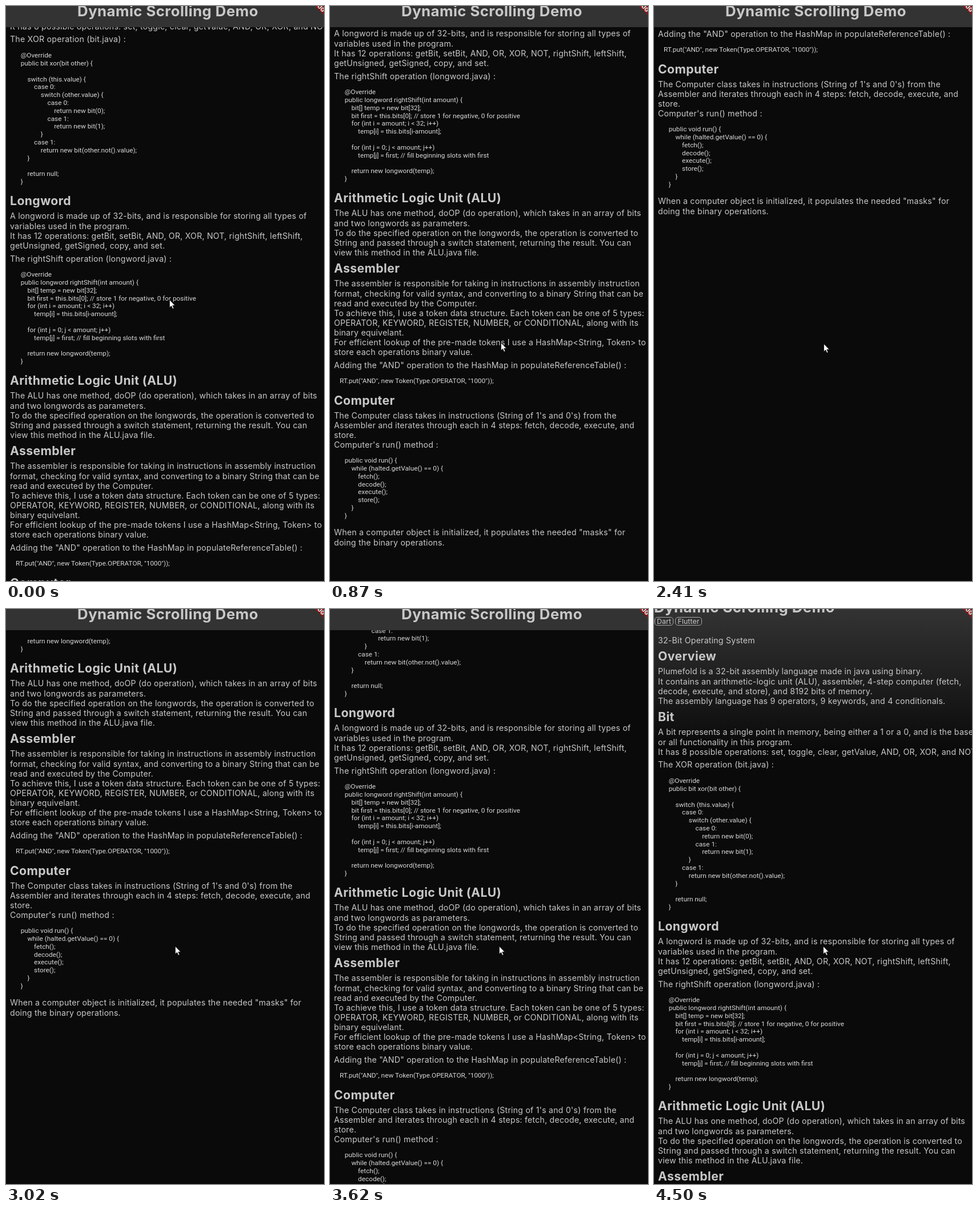
Write an HTML page that moves like this. It is 557 px wide and 1005 px high and loops after 4.81 s.

```html
<!DOCTYPE html>
<html lang="en">
<head>
<meta charset="utf-8">
<title>Dynamic Scrolling Demo</title>
<style>
html, body { margin: 0; width: 100%; height: 100%; overflow: hidden; background: #0a0a0a; }
#stage { position: relative; width: 557px; height: 1005px; overflow: hidden; background: #0a0a0a; color: #c8c8c8; }
#page, #cursor { position: absolute; left: 0; top: 0; will-change: transform; }
#page { width: 557px; }
#glow { position: absolute; left: 0; top: -614px; width: 557px; height: 645px;
  background: linear-gradient(#333 400px, #0a0a0a); }
.block { position: absolute; white-space: pre; }
.text { left: 7px; font: 14.2px/17.06px Inter, sans-serif; letter-spacing: .2px; }
.head { left: 7px; font: 700 21.2px/26px Inter, sans-serif; letter-spacing: .4px; }
.code { left: 14px; font: 11.8px/13.82px Roboto, sans-serif; color: #d8d8d8; }
.title { left: 0; font: 700 25.8px/32px Inter, sans-serif; letter-spacing: .42px; }
.chip { box-sizing: border-box; height: 15px; border: 1px solid #a8a8a8; border-radius: 5px;
  font: 12.3px/13px Inter, sans-serif; letter-spacing: .1px; text-align: center; top: -200px; }
#bar { position: absolute; left: 0; top: 0; width: 557px; height: 36.5px; background: #333; }
#bar .title { width: 567px; top: -7px; text-align: center; }
svg { position: absolute; left: 0; top: 0; overflow: visible; }
#ribbon text { font: 900 10.2px Roboto, sans-serif; fill: #e8e8e8; text-anchor: middle; }
</style>
</head>
<body>
<div id="stage">
  <div id="page">
    <div id="glow"></div>
    <div class="block chip" style="left:1px;width:33px">Dart</div>
    <div class="block chip" style="left:37px;width:47px">Flutter</div>
  </div>
  <div id="bar"><div class="block title">Dynamic Scrolling Demo</div></div>
  <svg id="ribbon" width="557" height="40">
    <path d="M540 0L557 17V0Z" fill="#7d1a1a"/>
    <text transform="translate(545.5 -3) rotate(45)" y="3.6">DEBUG</text>
  </svg>
  <svg id="cursor" width="12" height="18">
    <path d="M.5 .5V14L3.6 11.2L5.9 16.3L8 15.4L5.8 10.4H10Z" fill="#fff" stroke="#111" stroke-width=".8"/>
  </svg>
</div>
<script>
const LOOP = 4810;
const $ = id => document.getElementById(id);
const page = $('page'), bar = $('bar'), cursor = $('cursor');
const lineHeight = { text: 17.06, head: 26, code: 13.82, title: 32 };

// Places a block so that its first line is centred on y.
function add(kind, y, text) {
  const el = document.createElement('div');
  el.className = 'block ' + kind;
  el.style.top = y - lineHeight[kind] / 2 + 'px';
  el.textContent = text;
  page.append(el);
}

add('title', -217, 'Dynamic Scrolling Demo');
add('text', -159.5, '32-Bit Operating System');
add('head', -132, 'Overview');
add('text', -105, `Plumefold is a 32-bit assembly language made in java using binary.
It contains an arithmetic-logic unit (ALU), assembler, 4-step computer (fetch,
decode, execute, and store), and 8192 bits of memory.
The assembly language has 9 operators, 9 keywords, and 4 conditionals.`);
add('head', -26, 'Bit');
add('text', 1, `A bit represents a single point in memory, being either a 1 or a 0, and is the base
or all functionality in this program.
It has 8 possible operations: set, toggle, clear, getValue, AND, OR, XOR, and NOT.`);
add('text', 58, 'The XOR operation (bit.java) :');
add('code', 87, `    @Override
    public bit xor(bit other) {

        switch (this.value) {
            case 0:
                switch (other.value) {
                    case 0:
                        return new bit(0);
                    case 1:
                        return new bit(1);
                }
            case 1:
                return new bit(other.not().value);
        }

        return null;
    }`);
add('head', 340, 'Longword');
add('text', 367, `A longword is made up of 32-bits, and is responsible for storing all types of
variables used in the program.
It has 12 operations: getBit, setBit, AND, OR, XOR, NOT, rightShift, leftShift,
getUnsigned, getSigned, copy, and set.`);
add('text', 441.5, 'The rightShift operation (longword.java) :');
add('code', 470, `    @Override
    public longword rightShift(int amount) {
        bit[] temp = new bit[32];
        bit first = this.bits[0]; // store 1 for negative, 0 for positive
        for (int i = amount; i < 32; i++)
            temp[i] = this.bits[i-amount];

        for (int j = 0; j < amount; j++)
            temp[j] = first; // fill beginning slots with first

        return new longword(temp);
    }`);
add('head', 654, 'Arithmetic Logic Unit (ALU)');
add('text', 681, `The ALU has one method, doOP (do operation), which takes in an array of bits
and two longwords as parameters.
To do the specified operation on the longwords, the operation is converted to
String and passed through a switch statement, returning the result. You can
view this method in the ALU.java file.`);
add('head', 777, 'Assembler');
add('text', 804, `The assembler is responsible for taking in instructions in assembly instruction
format, checking for valid syntax, and converting to a binary String that can be
read and executed by the Computer.
To achieve this, I use a token data structure. Each token can be one of 5 types:
OPERATOR, KEYWORD, REGISTER, NUMBER, or CONDITIONAL, along with its
binary equivelant.
For efficient lookup of the pre-made tokens I use a HashMap<String, Token> to
store each operations binary value.`);
add('text', 947, 'Adding the "AND" operation to the HashMap in populateReferenceTable() :');
add('code', 975, ' RT.put("AND", new Token(Type.OPERATOR, "1000"));');
add('head', 1007.5, 'Computer');
add('text', 1034.5, `The Computer class takes in instructions (String of 1's and 0's) from the
Assembler and iterates through each in 4 steps: fetch, decode, execute, and
store.
Computer's run() method :`);
add('code', 1114, `    public void run() {
        while (halted.getValue() == 0) {
            fetch();
            decode();
            execute();
            store();
        }
    }`);
add('text', 1239, `When a computer object is initialized, it populates the needed "masks" for
doing the binary operations.`);

// Each move: first step, last step, number of steps, then scroll and pointer reached.
const start = [0, 286, 513];
const moves = [
  [60, 540, 8, 266, 291, 584],
  [630, 630, 1, 266, 299, 588],
  [810, 1290, 9, 638, 298, 589.5],
  [1410, 1410, 1, 638, 297, 590],
  [1810, 2170, 6, 899, 297, 590],
  [2410, 2770, 7, 552, 296, 589],
  [3020, 3470, 8, 163, 296, 589],
  [3560, 3560, 1, 161, 296, 589],
  [3620, 3620, 1, 159, 296, 589],
  [3930, 4440, 9, -213, 296, 589],
  [4500, 4500, 1, -214, 296, 589],
];
const LEAD = 0.02;
const ease = u => u + u * u - u * u * u;

function poseAt(t) {
  let pose = start;
  for (const [t0, t1, steps, ...goal] of moves) {
    if (t < t0) break;
    const gap = (t1 - t0) / (steps - 1) || 1;
    const k = Math.min(steps - 1, Math.floor((t - t0) / gap + 1e-6));
    const p = ease((k + LEAD) / (steps - 1 + LEAD));
    pose = pose.map((v, i) => v + (goal[i] - v) * p);
  }
  return pose;
}

const origin = performance.now();
function draw() {
  const [scroll, x, y] = poseAt((performance.now() - origin) % LOOP);
  page.style.transform = `translateY(${Math.round(-scroll)}px)`;
  bar.style.opacity = Math.max(0, Math.min(1, (scroll + 210) / 50));
  cursor.style.transform = `translate(${Math.round(x)}px, ${Math.round(y)}px)`;
  requestAnimationFrame(draw);
}
draw();
</script>
</body>
</html>
```
